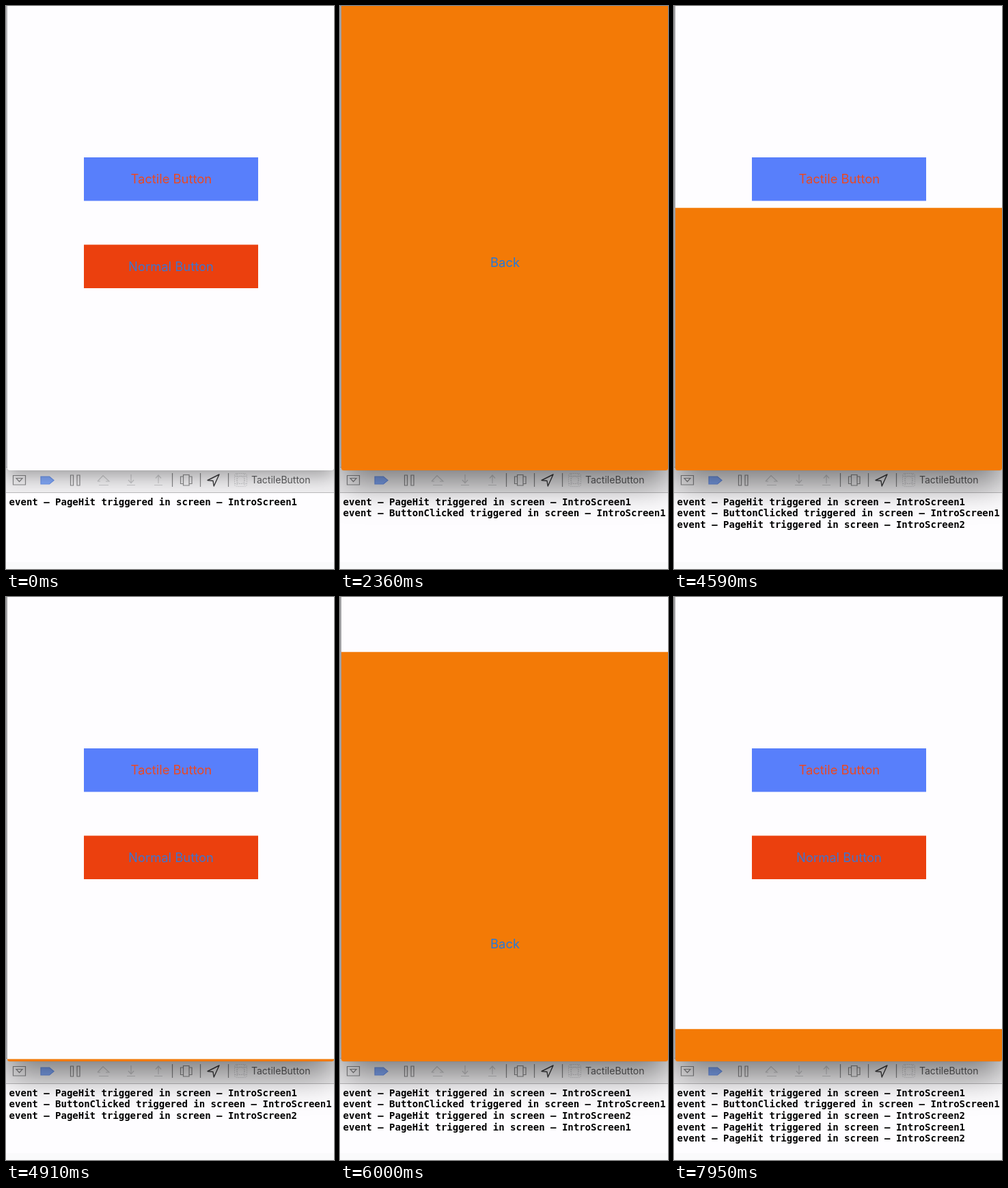
Write an HTML page that moves like this. It is 480 by 822 pixels and loops after 8000 ms.

```html
<!DOCTYPE html>
<html lang="en">
<head>
<meta charset="utf-8">
<title>Tactile button</title>
<style>
  html, body { margin: 0; width: 100%; height: 100%; overflow: hidden; background: #fefdff; }
  #stage { position: relative; width: 480px; height: 822px; overflow: hidden; }
  svg { position: absolute; left: 0; top: 0; display: block; }
  text { white-space: pre; }
  .log { font: bold 14px "DejaVu Sans Mono", monospace; fill: #000; }
  .ui { font: 18.4px Inter, sans-serif; text-anchor: middle; }
  .project { font: 14px Inter, sans-serif; fill: #5c5c5e; }
  .icon { fill: none; stroke: #858587; stroke-width: 1.2; }
  .faint { stroke: #c6c6c8; }
  .dark { stroke: #3a3a3c; stroke-width: 1.4; }
  #simulator {
    position: absolute; left: 2px; top: -174px; width: 478px; height: 852px;
    overflow: hidden; background: #fefdff; border-radius: 0 0 3px 3px;
    box-shadow: 0 0 1px rgba(0, 0, 0, .35), 0 9px 26px rgba(0, 0, 0, .33);
  }
  #simulator.active {
    box-shadow: 0 0 1px rgba(0, 0, 0, .35), 0 20px 50px rgba(0, 0, 0, .5);
  }
</style>
</head>
<body>
<div id="stage">
  <svg width="480" height="822">
    <rect width="480" height="822" fill="#fefdff"/>
    <rect width="3" height="673" fill="#dcdce0"/>
    <rect y="673" width="480" height="38" fill="#efeef0"/>
    <path d="M0 673.5H480M0 710.5H480" stroke="#bab9bb"/>
    <rect y="812" width="480" height="10" fill="#fafafb"/>

    <g class="icon">
      <path d="M10.5 685.5h18v13.5h-18zM15 689.5h9l-4.5 5z"/>
      <path d="M51 687h12.5l6.5 5.5-6.5 5.5H51z" fill="#82a8f8" stroke="#6b93ea"/>
      <path d="M94.5 685h4v15h-4zM104 685h4v15h-4z"/>
      <g class="faint">
        <path d="M134 694l8-8.500 9 8.500h-5M134 694h4M136 699.500h14"/>
        <path d="M183 684v12M179 692l4 4.500 4-4.500M177 699.500h12"/>
        <path d="M223 697v-12M219 689.500l4-4.500 4 4.500M217 699.500h12"/>
      </g>
      <path d="M243.500 682v20M284.500 682v20M325.500 682v20"/>
      <path d="M259.500 684.500h8.500v15.500h-8.500zM259 687h-3.500v10.500h3.500M268.500 687h3.500v10.500h-3.500"/>
      <path class="dark" d="M312 684l-17 8.500 8 .8 1.200 7.700z" stroke-linejoin="round"/>
      <g class="faint" stroke-dasharray="2 1" stroke-width=".8">
        <rect x="334.500" y="682.500" width="18" height="19" rx="3"/>
        <circle cx="343.500" cy="692" r="5.500"/>
        <path d="M338 683v18M349 683v18M335 686.500h18M335 697.500h18"/>
      </g>
    </g>
    <text class="project" x="359" y="697">TactileButton</text>
    <g id="console"></g>
  </svg>

  <div id="simulator">
    <svg width="478" height="852" viewBox="2 -174 478 852">
      <rect x="114" y="221" width="255" height="63.500" fill="#587ffb"/>
      <text class="ui" x="241.800" y="259.200" fill="#ea4824">Tactile Button</text>
      <rect x="114" y="348.500" width="255" height="63.500" fill="#eb400e"/>
      <text class="ui" x="241.500" y="387" fill="#3f74cc">Normal Button</text>
      <g id="modal">
        <rect x="2" y="-174" width="478" height="852" fill="#f37a06"/>
        <text class="ui" x="241.500" y="259.200" fill="#2579da">Back</text>
      </g>
    </svg>
  </div>
</div>

<script>
  const LOOP = 8000;
  const SCREEN_HEIGHT = 852;
  const TRANSITION = 500;
  const SPRING_RATE = Math.sqrt(1000 / 3) / 1000;
  const ACTIVATE_AT = 2100;

  const transitions = [
    { at: 2173, shows: true },
    { at: 4490, shows: false },
    { at: 5867, shows: true },
    { at: 7698, shows: false }
  ];
  const events = [
    { at: 0, name: 'PageHit', screen: 1 },
    { at: 2173, name: 'ButtonClicked', screen: 1 },
    { at: 2673, name: 'PageHit', screen: 2 },
    { at: 4990, name: 'PageHit', screen: 1 },
    { at: 6367, name: 'PageHit', screen: 2 }
  ];

  const simulator = document.getElementById('simulator');
  const modal = document.getElementById('modal');
  const consoleView = document.getElementById('console');

  const logLines = events.map(({ name, screen }, i) => {
    const line = document.createElementNS(consoleView.namespaceURI, 'text');
    line.setAttribute('class', 'log');
    line.setAttribute('x', 4.6);
    line.setAttribute('y', 728.7 + 16.6 * i);
    line.textContent = `event – ${name} triggered in screen – IntroScreen${screen}`;
    return consoleView.appendChild(line);
  });

  // Remaining distance of a critically damped spring, from 1 to 0.
  function springRemainder(elapsed) {
    if (elapsed >= TRANSITION) return 0;
    const x = SPRING_RATE * elapsed;
    return (1 + x) * Math.exp(-x);
  }

  function modalOffset(time) {
    const current = transitions.filter(({ at }) => at <= time).pop();
    if (!current) return SCREEN_HEIGHT;
    const remainder = springRemainder(time - current.at);
    return SCREEN_HEIGHT * (current.shows ? remainder : 1 - remainder);
  }

  function render(time) {
    modal.setAttribute('transform', `translate(0 ${modalOffset(time)})`);
    simulator.classList.toggle('active', time >= ACTIVATE_AT);
    logLines.forEach((line, i) => {
      line.style.visibility = time >= events[i].at ? 'visible' : 'hidden';
    });
  }

  const start = performance.now();
  function tick() {
    render((performance.now() - start) % LOOP);
    requestAnimationFrame(tick);
  }
  tick();
</script>
</body>
</html>
```
